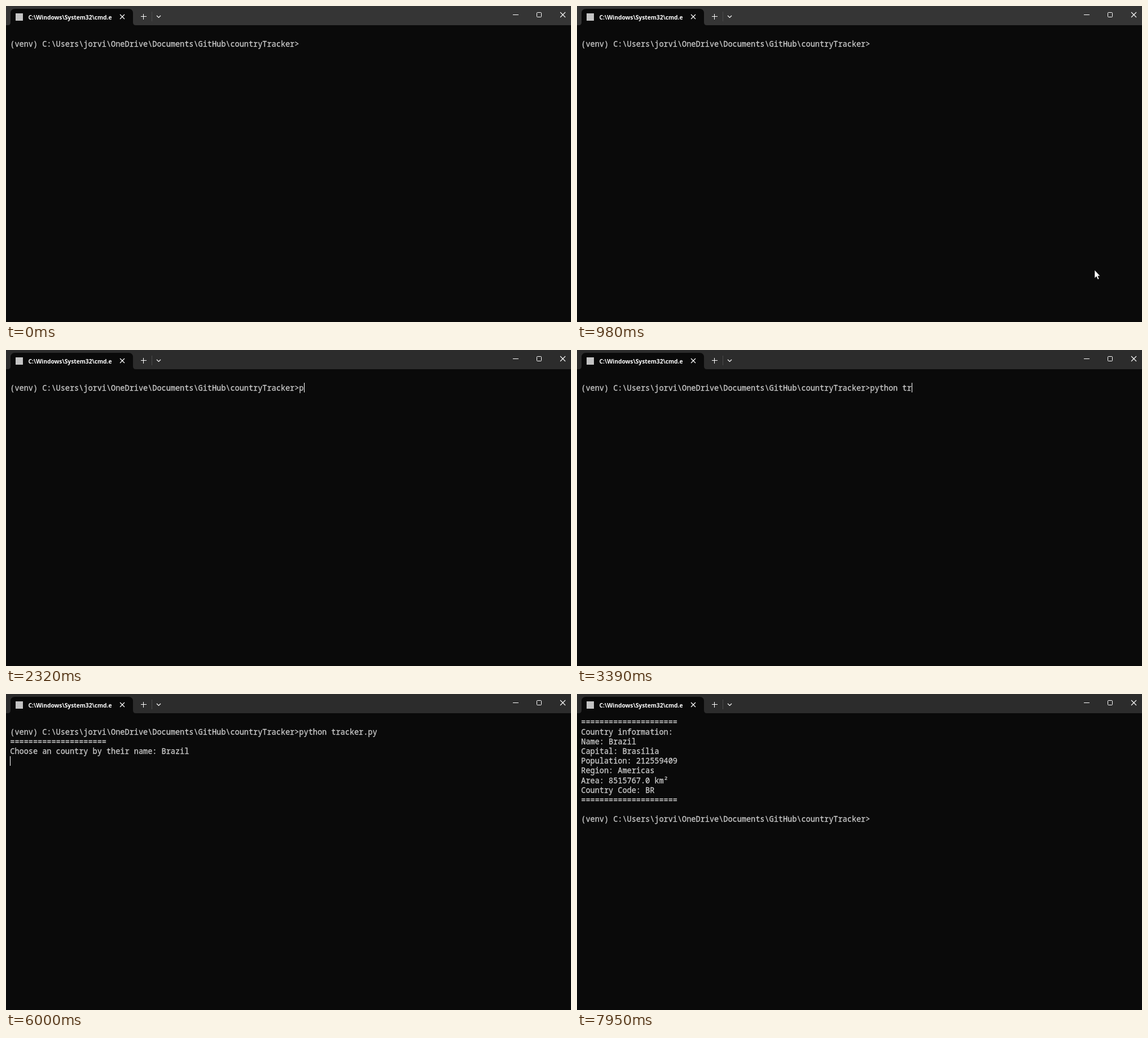
These frames come from a looping animation (1001x559 px, 8 s). An HTML page:

```html
<!DOCTYPE html>
<html lang="en">
<head>
<meta charset="utf-8">
<title>Country tracker terminal</title>
<style>
  html, body { margin: 0; width: 100%; height: 100%; overflow: hidden; background: #0a0a0a; }
  #stage { position: relative; width: 1001px; height: 559px; overflow: hidden; background: #0a0a0a; }
  #bar {
    position: absolute; inset: 0 0 auto 0; height: 33.5px; background: #353535;
    animation: focus 8s linear infinite;
  }
  @keyframes focus {
    0%, 25.6% { background: #353535; }
    28%, 100% { background: #2c2c2c; }
  }
  #chrome { position: absolute; left: 0; top: 0; }
  #title {
    position: absolute; left: 39.5px; top: 13px; width: 150px; overflow: hidden; white-space: nowrap;
    font: 700 10.25px/15px "Open Sans", "Noto Sans", sans-serif; color: #fff;
  }
  #screen {
    position: absolute; left: 7.3px; top: 41.3px; margin: 0; color: #ccc;
    font: 500 13.567px/17.2px "Noto Sans Mono", "DejaVu Sans Mono", monospace;
    font-variant-ligatures: none; -webkit-text-stroke: .3px #ccc;
  }
  #caret { position: absolute; left: 0; top: 0; width: 1px; height: 17px; background: #fff; }
  #mouse { position: absolute; left: 0; top: 0; overflow: visible; }
</style>
</head>
<body>
<div id="stage">
  <div id="bar"></div>
  <svg id="chrome" width="1001" height="34" fill="none" stroke="#fff">
    <path d="M3 34Q8 34 8 29V13Q8 5 16 5H217Q225 5 225 13V29Q225 34 230 34Z" fill="#0a0a0a" stroke="none"/>
    <rect x="17" y="13" width="13" height="13" fill="#c4c4c4" stroke="none"/>
    <path d="M202 15l8 8m0-8l-8 8" stroke-width="1.2"/>
    <path d="M239 18.5h10M243.5 14v10"/>
    <path d="M258.5 10v17" stroke="#4b4b4b"/>
    <path d="M267 17l3.5 3.5L274 17" stroke-width="1.2"/>
    <path d="M898 15.5h10"/>
    <rect x="940.5" y="11.5" width="8" height="8" rx="1"/>
    <path d="M982 11l9 9m0-9l-9 9" stroke-width="1.1"/>
  </svg>
  <div id="title">C:\Windows\System32\cmd.e</div>
  <pre id="screen"></pre>
  <div id="caret"></div>
  <svg id="mouse" width="12" height="18">
    <path d="M0 0V14.6L3.3 11.5L5.6 16.8L8 15.8L5.8 10.7H10Z" fill="#fff" stroke="#000" stroke-width=".6"/>
  </svg>
</div>
<script>
const LOOP = 8000, CELL = 8.14, ROW = 17.2, LEFT = 7.3, TOP = 40.8;
const PROMPT = "(venv) C:\\Users\\jorvi\\OneDrive\\Documents\\GitHub\\countryTracker>";
const RULE = "=".repeat(21);
const ASK = "Choose an country by their name: ";
const REPORT = [
  RULE, "Country information:", "Name: Brazil", "Capital: Brasília",
  "Population: 212559409", "Region: Americas", "Area: 8515767.0 km²",
  "Country Code: BR", RULE, ""
];

const COMMAND = "python tracker.py";
const COMMAND_KEYS = [2320, 2560, 2640, 2720, 2800, 2880, 2960, 3060, 3160,
  3490, 3530, 3570, 3610, 3640, 3670, 3700, 3720];
const ANSWER = "Brazil";
const ANSWER_KEYS = [5250, 5390, 5530, 5590, 5630, 5810];

const ENTER = 3950, ASKED = 4450, ANSWERED = 6000, REPORTED = 6650, DONE = 6900;

// Each stretch of visible pointer: points of [time, x, y]
const POINTER = [
  [[50, 986, 556], [450, 950, 512], [840, 917, 467], [2320, 917, 467]],
  [[3640, 918, 431], [3720, 918, 388], [3950, 918, 388], [4300, 937, 385],
   [4740, 917, 383], [4970, 917, 383], [5250, 944, 386]]
];

const byId = id => document.getElementById(id);
const screenEl = byId("screen"), caretEl = byId("caret"), mouseEl = byId("mouse");
const typed = (text, keys, t) => text.slice(0, keys.filter(k => k <= t).length);

function linesAt(t) {
  if (t >= REPORTED) return t < DONE ? REPORT : [...REPORT, PROMPT];
  const lines = ["", PROMPT + typed(COMMAND, COMMAND_KEYS, t)];
  if (t >= ASKED) lines.push(RULE, ASK + typed(ANSWER, ANSWER_KEYS, t));
  if (t >= ENTER && t < ASKED || t >= ANSWERED) lines.push("");
  return lines;
}

function pointerAt(t) {
  const path = POINTER.find(p => t >= p[0][0] && t < p[p.length - 1][0]);
  if (!path) return null;
  const i = path.findIndex(p => p[0] > t);
  const [t0, x0, y0] = path[i - 1], [t1, x1, y1] = path[i];
  const u = (t - t0) / (t1 - t0), e = u * u * (3 - 2 * u);
  return [x0 + (x1 - x0) * e, y0 + (y1 - y0) * e];
}

function place(el, x, y) {
  el.style.transform = `translate(${Math.round(x)}px, ${Math.round(y)}px)`;
}

let shown = null;
function draw() {
  const t = performance.now() % LOOP;
  const lines = linesAt(t), text = lines.join("\n");
  if (text !== shown) screenEl.textContent = shown = text;

  const row = lines.length - 1;
  place(caretEl, LEFT + lines[row].length * CELL, TOP + row * ROW);
  caretEl.style.visibility = t >= 2050 && t < 7480 ? "visible" : "hidden";

  const tip = pointerAt(t);
  mouseEl.style.visibility = tip ? "visible" : "hidden";
  if (tip) place(mouseEl, ...tip);
  requestAnimationFrame(draw);
}
draw();
</script>
</body>
</html>
```
